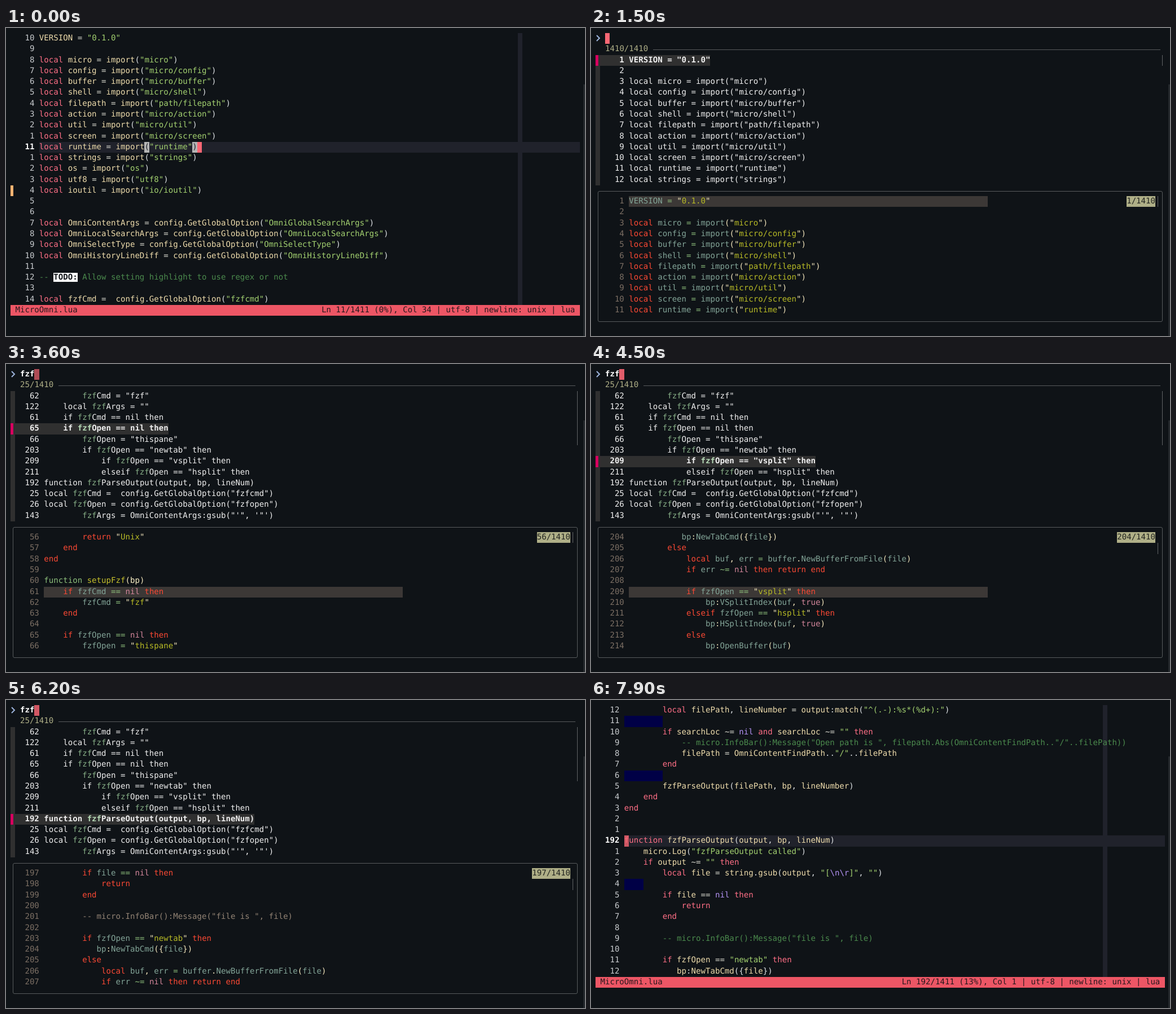
An HTML page for the animation above (8000 ms loop, 1026x546 px).

```html
<!DOCTYPE html>
<html lang="en">
<head>
<meta charset="utf-8">
<title>Fuzzy search in the editor</title>
<style>
  html, body { margin: 0; width: 100%; height: 100%; overflow: hidden; background: #0f1317; }
  #stage {
    position: relative; width: 1026px; height: 546px; overflow: hidden; background: #0f1317;
    font: 14.083px/19.28px "DejaVu Sans Mono", monospace;
    text-rendering: geometricPrecision; font-variant-ligatures: none;
  }
  #stage div, #stage svg { position: absolute; }
  .line { white-space: pre; height: 19.28px; }
  .todo { background: #fff; color: #0f1317; font-weight: bold; }
  .frame { left: 12px; top: 289px; width: 999px; height: 230px; border: 1px solid #585b5d; border-radius: 3px; }
  #edge { left: 1023px; top: 100px; width: 3px; height: 446px; background: #25292d; }
  #cursor { width: 8.48px; height: 19.28px; background: #fb6774; }
</style>
</head>
<body>
<div id="stage">
  <div id="view"></div>
  <div id="cursor"></div>
  <div id="edge"></div>
</div>
<script>
const LOOP = 8000, CW = 1009 / 119, RH = 19.28, LEFT = 8, TOP = 9;
const view = document.getElementById('view');
const cursor = document.getElementById('cursor');

// Blocks of the edited file, keyed by their first line number.
const blocks = {
1: `VERSION = "0.1.0"

local micro = import("micro")
local config = import("micro/config")
local buffer = import("micro/buffer")
local shell = import("micro/shell")
local filepath = import("path/filepath")
local action = import("micro/action")
local util = import("micro/util")
local screen = import("micro/screen")
local runtime = import("runtime")
local strings = import("strings")
local os = import("os")
local utf8 = import("utf8")
local ioutil = import("io/ioutil")


local OmniContentArgs = config.GetGlobalOption("OmniGlobalSearchArgs")
local OmniLocalSearchArgs = config.GetGlobalOption("OmniLocalSearchArgs")
local OmniSelectType = config.GetGlobalOption("OmniSelectType")
local OmniHistoryLineDiff = config.GetGlobalOption("OmniHistoryLineDiff")

-- TODO: Allow setting highlight to use regex or not

local fzfCmd =  config.GetGlobalOption("fzfcmd")
local fzfOpen = config.GetGlobalOption("fzfopen")`,
56: `        return "Unix"
    end
end

function setupFzf(bp)
    if fzfCmd == nil then
        fzfCmd = "fzf"
    end

    if fzfOpen == nil then
        fzfOpen = "thispane"
    end
end

`,
117: `end


function OmniContent(bp)
    setupFzf(bp)
    local fzfArgs = ""
    local selectedText = ""

    if bp.Cursor:HasSelection() then
        selectedText = bp.Cursor:GetSelection()
    end`,
143: `        fzfArgs = OmniContentArgs:gsub("'", '"')`,
180: `        local filePath, lineNumber = output:match("^(.-):%s*(%d+):")
        
        if searchLoc ~= nil and searchLoc ~= "" then
            -- micro.InfoBar():Message("Open path is ", filepath.Abs(OmniContentFindPath.."/"..filePath))
            filePath = OmniContentFindPath.."/"..filePath
        end
        
        fzfParseOutput(filePath, bp, lineNumber)
    end
end


function fzfParseOutput(output, bp, lineNum)
    micro.Log("fzfParseOutput called")
    if output ~= "" then
        local file = string.gsub(output, "[\\n\\r]", "")
    
        if file == nil then
            return
        end

        -- micro.InfoBar():Message("file is ", file)

        if fzfOpen == "newtab" then
           bp:NewTabCmd({file})
        else
            local buf, err = buffer.NewBufferFromFile(file)
            if err ~= nil then return end

            if fzfOpen == "vsplit" then
                bp:VSplitIndex(buf, true)
            elseif fzfOpen == "hsplit" then
                bp:HSplitIndex(buf, true)
            else
                bp:OpenBuffer(buf)
            end
        end`
};
const code = [];
for (const [first, text] of Object.entries(blocks))
  text.split('\n').forEach((s, i) => { code[+first + i] = s; });

const editTheme = { key: '#ff6f86', def: '#ff6f86', id: '#eedcac', fn: '#eedcac', arg: '#eedcac', op: '#dcdcd2',
  mark: '#dde1e4', quote: '#a3d170', str: '#a3d170', esc: '#b493f5', lit: '#b493f5', note: '#4b8a4d' };
const viewTheme = { key: '#fb4934', def: '#8ec07c', id: '#83a598', fn: '#c6c02c', arg: '#fbf1c7', op: '#8ec07c',
  mark: '#f2e5bc', quote: '#f2e5bc', str: '#b8bb26', esc: '#b8bb26', lit: '#d3869b', note: '#928374' };

const esc = s => s.replace(/&/g, '&amp;').replace(/</g, '&lt;');
const span = (s, color) => `<span style="color:${color}">${esc(s)}</span>`;
const x = col => LEFT + col * CW;
const y = row => TOP + row * RH;
const rect = (l, t, w, h, color) =>
  `<div style="left:${l}px;top:${t}px;width:${w}px;height:${h}px;background:${color}"></div>`;
const cells = (col, row, w, h, color) => rect(x(col), y(row), w * CW, h * RH, color);
const put = (col, row, html, color = '#f0f0f0', bold = false) =>
  `<div class="line" style="left:${x(col)}px;top:${y(row)}px;color:${color}${bold ? ';font-weight:bold' : ''}">${html}</div>`;

const TOKEN = /--.*|"[^"]*"|'[^']*'|\w+|\s+|[^\w\s]/g;
const KEY = /^(local|if|then|else|elseif|end|return|and)$/;

function paint(line, th) {
  const isDef = line.startsWith('function ');
  let prev = '';
  return (line.match(TOKEN) || []).map(s => {
    const last = prev;
    if (s.trim()) prev = s;
    if (s.startsWith('--'))
      return span(s, th.note).replace('TODO:', th === editTheme ? '<span class="todo">TODO:</span>' : 'TODO:');
    if (/^["']/.test(s)) {
      const inner = s.slice(1, -1).split(/(\\.)/).map(p => span(p, p[0] === '\\' ? th.esc : th.str)).join('');
      return span(s[0], th.quote) + inner + span(s[0], th.quote);
    }
    if (s === 'function') return span(s, th.def);
    if (KEY.test(s)) return span(s, th.key);
    if (/^(nil|true)$/.test(s)) return span(s, th.lit);
    if (/^\w/.test(s)) return span(s, last === 'function' ? th.fn : isDef ? th.arg : th.id);
    return span(s, /[=~]/.test(s) ? th.op : th.mark);
  }).join('');
}

function editor(top, cur, status) {
  let h = cells(6, cur - top, 113, 1, '#20222b') + cells(106, 0, 1, 25, '#20222b');
  for (let row = 0; row < 25; row++) {
    const n = top + row, s = code[n], here = n === cur;
    if (s && !s.trim()) h += cells(6, row, s.length, 1, '#000046');
    h += put(0, row, String(here ? n : Math.abs(n - cur)).padStart(5), here ? '#ffffff' : '#c9cccf', here);
    h += put(6, row, paint(s, editTheme));
  }
  if (top === 1) {
    for (const [col, ch] of [[28, '('], [38, ')']])
      h += cells(col, 10, 1, 1, '#b4b4b4') + put(col, 10, ch, '#20222b');
    h += rect(LEFT, y(14), 5, RH, '#ffb472');
  }
  return h + cells(0, 25, 119, 1, '#ed5665') + put(1, 25, 'MicroOmni.lua', '#25171c') +
    put(118 - status.length, 25, status, '#25171c');
}

const firstLines = Array.from({ length: 12 }, (_, i) => i + 1);
const hits = [62, 122, 61, 65, 66, 203, 209, 211, 192, 25, 26, 143];

function listRow(n, i, query, on) {
  const s = code[n], at = query ? s.indexOf(query) : -1;
  const text = at < 0 ? esc(s)
    : esc(s.slice(0, at)) + span(query, on ? '#b5d8b5' : '#87af87') + esc(s.slice(at + query.length));
  const row = i + 2;
  return (on ? cells(0, row, 7 + s.length, 1, '#303030') + rect(LEFT, y(row), 5, RH, '#d7005f') : '') +
    put(3, row, String(n).padStart(3), '#f0f0f0', on) + put(7, row, text, '#f0f0f0', on);
}

function finder(query, sel, top, mark) {
  const found = query.length < 2 ? 1410 : query.length < 3 ? 31 : 25;
  const count = found + '/1410', lineStart = x(3 + count.length);
  const bar = Math.max(1, Math.floor(144 / found));
  let h = `<svg width="30" height="30" style="left:0;top:0"><path d="M10 13l5 5-5 5" fill="none" stroke="#9db4dc" stroke-width="2"/></svg>`;
  h += put(2, 0, query, '#ffffff', true) + put(2, 1, count, '#afaf87');
  h += rect(lineStart, 38, x(118) - lineStart, 1, '#585b5d');
  h += cells(0, 2, 1, 12, '#303030') + rect(1012, y(2), 1, bar * RH, '#606365');
  (found === 1410 ? firstLines : hits).forEach((n, i) => {
    h += listRow(n, i, found === 1410 ? '' : query, i === sel);
  });

  h += '<div class="frame"></div>';
  for (let i = 0; i < 11; i++) {
    const n = top + i;
    if (n === mark) h += cells(7, 15 + i, 75, 1, '#3c3836');
    h += put(3, 15 + i, String(n).padStart(3), '#7c6f64') + put(7, 15 + i, paint(code[n] || '', viewTheme));
  }
  const badge = top + '/1410';
  h += cells(117 - badge.length, 15, badge.length, 1, '#afaf87') + put(117 - badge.length, 15, badge, '#22241f');
  return h + rect(1003.5, y(top < 187 ? 15 : 16), 1, RH, '#606365');
}

// Timelines: [start ms, value...]
const screens = [[0, 'start'], [400, 'find'], [7700, 'jump']];
const queries = [[0, ''], [1800, 'f'], [1900, 'fz'], [2100, 'fzf']];
const picks = [[0, 0], [2800, 1], [3100, 2], [3600, 3], [3800, 4], [4000, 5], [4200, 6], [4800, 7], [5100, 8]];
const previews = [[0, 1, 1], [1900, 57, 62], [2800, 117, 122], [3200, 56, 61], [3700, 60, 65], [3900, 61, 66],
  [4100, 198, 203], [4300, 204, 209], [4900, 206, 211], [5200, 187, 192], [5700, 192, 192], [6000, 197, 192],
  [6800, 192, 192], [7100, 187, 192]];
// Cursor fades: [start ms, length]
const fades = [[0, 0], [250, 150], [650, 850], [1500, 300], [2200, 400], [3420, 850], [4440, 850],
  [5460, 840], [6500, 800], [7550, 150], [7780, 850]];

const now = (table, t) => table.filter(e => e[0] <= t).pop();

let shown = '';
function render(t) {
  const [, screen] = now(screens, t), [, query] = now(queries, t), [, sel] = now(picks, t);
  const [, top, mark] = now(previews, t);
  const key = [screen, query, sel, top].join();
  if (key !== shown) {
    shown = key;
    view.innerHTML = screen === 'start' ? editor(1, 11, 'Ln 11/1411 (0%), Col 34 | utf-8 | newline: unix | lua')
      : screen === 'jump' ? editor(180, 192, 'Ln 192/1411 (13%), Col 1 | utf-8 | newline: unix | lua')
      : finder(query, sel, top, mark);
    const [col, row] = screen === 'start' ? [39, 10] : screen === 'jump' ? [6, 12] : [2 + query.length, 0];
    cursor.style.left = x(col) + 'px';
    cursor.style.top = y(row) + 'px';
  }
  const [start, len] = now(fades, t);
  const p = t - start;
  cursor.style.opacity = 1 - 0.0018 * Math.max(0, Math.min(p, len - p));
}

const began = performance.now();
function tick() {
  render((performance.now() - began) % LOOP);
  requestAnimationFrame(tick);
}
tick();
</script>
</body>
</html>
```
